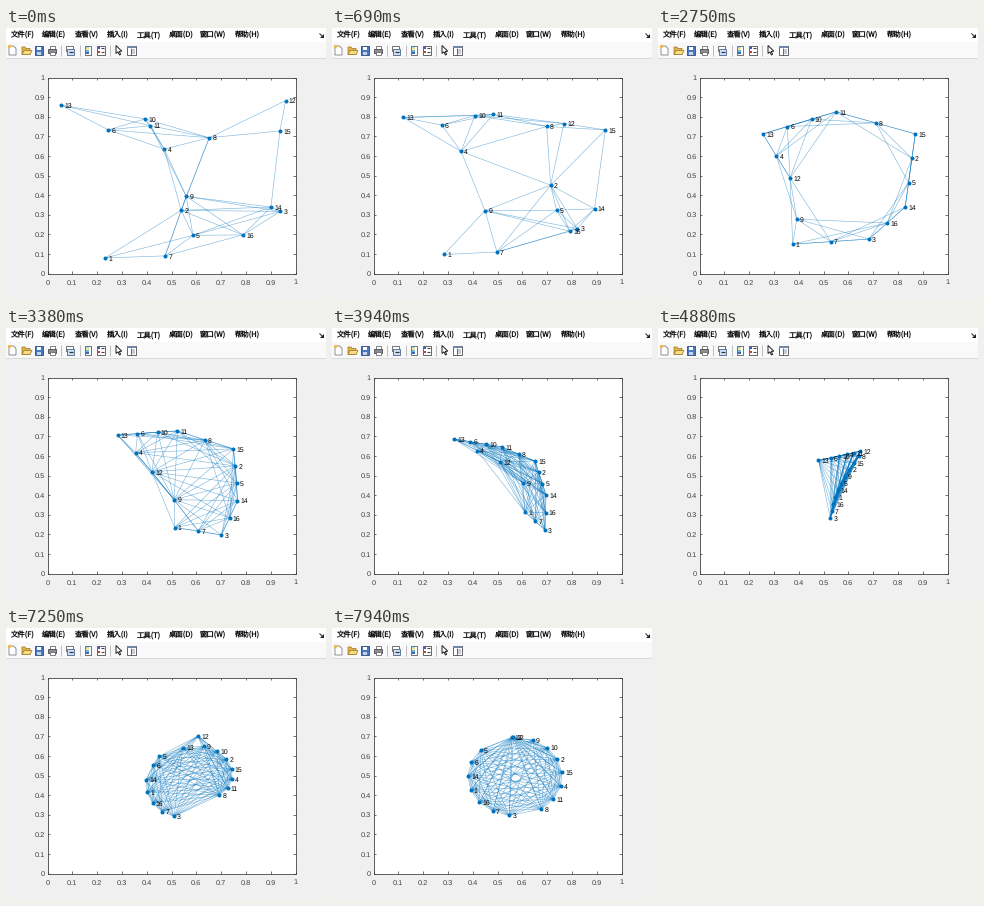
Animation of 320 by 272 pixels, one loop 8 s. Source, as a matplotlib script:

```python
import numpy as np
import matplotlib.pyplot as plt
from matplotlib.animation import FuncAnimation
from matplotlib.collections import LineCollection
from matplotlib.patches import Circle, Polygon, Rectangle

plt.rcParams["text.hinting"] = "none"

W, H, DPI = 320, 272, 80
PX = 72 / DPI                       # points per pixel
FRAMES, STEP = 200, 40
LEFT, RIGHT, TOP, BOTTOM = 41.5, 289.5, 49.5, 245.5
BLUE, INK = "#0072bd", "#3a3a3a"
N, REACH = 16, 0.41
SCALE = np.array([RIGHT - LEFT, BOTTOM - TOP])


# ---------- agent poses, in stage pixels ----------
def place(order, xs, ys):
    pose = np.zeros((N, 2))
    pose[np.array(order) - 1] = np.column_stack([xs, ys])
    return pose


LOOP = [13, 6, 10, 11, 8, 15, 2, 5, 14, 16, 3, 7, 1, 9, 12, 4]
ROW = [3, 7, 16, 1, 14, 13, 5, 6, 9, 10, 2, 15, 4, 11, 8, 12]
CORNERS = [LOOP.index(a) for a in (13, 11, 15, 14, 3, 1, 9, 12)]


def outline(corners):
    """Spread all agents along the closed polygon through the corners."""
    xs, ys = (np.interp(np.arange(N), CORNERS, c, period=N) for c in zip(*corners))
    return place(LOOP, xs, ys)


scatter = np.array([
    (99, 230), (174, 183), (275, 183), (159, 121), (186, 208), (102, 102),
    (159, 228), (203, 110), (181, 168), (139, 91), (144, 98), (281, 72),
    (55, 77), (265, 179), (274, 103), (237, 207)])
ring = outline([(105, 106), (178, 84), (257, 106), (247, 179),
                (211, 211), (135, 216), (139, 191), (132, 150)])
crescent = outline([(122, 111), (170, 119), (203, 133), (214, 167),
                    (213, 202), (193, 184), (191, 155), (168, 134)])

# on the way to the ring: a wider ring, with the longest trips lagging
hub = np.array([187, 150])
wide = hub + (ring - hub) * (1.2, 1.1)
trip = np.hypot(*(ring - scatter).T)
lag = 0.4 * (trip / trip.max())[:, None] ** 2
spread = wide + (scatter - wide) * lag

top, side = np.linspace(0, 1, 6) ** 0.75, np.linspace(0, 1, 10)
wedge = place([13, 6, 10, 4, 11, 12, 8, 15, 2, 9, 5, 14, 1, 16, 7, 3],
              np.r_[160 + 41.5 * top,
                    200.5 - 27.5 * side - 5 * np.sin(np.pi * side)],
              np.r_[132 - 8.5 * top, 128 + 62 * side])
line = place(ROW, np.linspace(129, 237, N), np.linspace(192, 102.5, N))
angle = np.radians(np.r_[94, 92, np.linspace(68, -56, 7), np.linspace(-97, -223, 7)])
circle = place([13, 12, 9, 10, 2, 15, 4, 11, 8, 3, 7, 16, 1, 14, 6, 5],
               183 + 0.19 * SCALE[0] * np.cos(angle),
               148.5 - 0.2 * SCALE[1] * np.sin(angle))

TIMES = np.array([0, 1440, 2750, 3940, 4880, 6200])
POSES = np.array([scatter, spread, ring, crescent, wedge, line])
SLOPES = np.gradient(POSES, TIMES, axis=0)
SLOPES[-1] = 0
TURN, END = 6420, 7940


def pose_at(t):
    if t >= TURN:
        s = (1 - np.exp(-2.4 * (t - TURN) / (END - TURN))) / (1 - np.exp(-2.4))
        return line + (circle - line) * s
    if t >= TIMES[-1]:
        return line
    i = np.searchsorted(TIMES, t, side="right") - 1
    d = TIMES[i + 1] - TIMES[i]
    s = (t - TIMES[i]) / d
    return ((1 + 2 * s) * (1 - s) ** 2 * POSES[i]
            + s * (1 - s) ** 2 * d * SLOPES[i]
            + s * s * (3 - 2 * s) * POSES[i + 1]
            + s * s * (s - 1) * d * SLOPES[i + 1])


A, B = np.triu_indices(N, 1)


def links(p):
    near = np.hypot(*((p[A] - p[B]) / SCALE).T) < REACH
    return np.stack([p[A[near]], p[B[near]]], axis=1)


# ---------- window ----------
fig = plt.figure(figsize=(W / DPI, H / DPI), dpi=DPI, facecolor="#f0f0f0")
ax = fig.add_axes([0, 0, 1, 1])
ax.set_xlim(0, W)
ax.set_ylim(H, 0)
ax.axis("off")


def rect(x, y, w, h, fill, edge="none", lw=0.8):
    ax.add_patch(Rectangle((x, y), w, h, fc=fill, ec=edge, lw=lw * PX))


def stroke(xs, ys, color=INK, lw=0.9):
    ax.plot(xs, ys, color=color, lw=lw * PX, solid_capstyle="butt")


def poly(points, fill, edge="none", lw=0.7):
    ax.add_patch(Polygon(points, fc=fill, ec=edge, lw=lw * PX))


def label(x, y, s, size, ha="left", color=INK, font="Liberation Sans"):
    return ax.text(x, y, s, fontsize=size * PX, ha=ha, va="baseline",
                   color=color, family=font)


rect(-1, -1, W + 2, 15, "#ffffff")
rect(-1, 14, W + 2, 16, "#f9f9f9")
stroke([-1, W], [30, 30], "#d8d8d8")

menu = ["文件(F)", "编辑(E)", "查看(V)", "插入(I)",
        "工具(T)", "桌面(D)", "窗口(W)", "帮助(H)"]
for x, s in zip([4, 36, 68, 100, 131, 162, 194, 229], menu):
    label(x, 9.8, s, 7.4, color="#111111", font="Noto Sans CJK JP")
stroke([313.5, 316.5], [5.5, 8.5], "#222222", 1)
poly([(317.5, 6), (317.5, 9.5), (314, 9.5)], "#222222")

# new, open, save, print
poly([(3, 18), (7.5, 18), (10, 20.5), (10, 27), (3, 27)], "#ffffff", "#666666")
ax.add_patch(Circle((3.5, 18.5), 1.6, fc="#f0b840"))
poly([(16, 19), (19, 19), (20, 20.5), (24, 20.5), (24, 26.5), (16, 26.5)],
     "#e2b54a", "#9a7420")
poly([(18, 22.5), (26, 22.5), (24, 26.5), (16, 26.5)], "#f8dc88", "#9a7420")
rect(29, 18, 7.5, 8.5, "#4a78c0", "#28457c")
rect(30.5, 18.5, 4.5, 3, "#ffffff")
rect(31, 23.5, 3.5, 3, "#c8d4e8")
rect(43.5, 17.5, 5, 4, "#ffffff", "#666666")
rect(42, 21, 8, 4, "#8d8d94", "#44444c")
rect(43.5, 24, 5, 3, "#ffffff", "#666666")
# link, color bar, legend
rect(59.5, 17.5, 7, 5, "#ffffff", "#555555")
rect(61, 20.5, 7, 6, "#cfe0f4", "#3f5f8c")
stroke([62.5, 66.5], [23.5, 23.5], "#333333", 1.2)
rect(78.5, 17.5, 6, 9, "#ffffff", "#555555")
for i, c in enumerate(["#a8d8f0", "#f0e8a0", "#70b8d8", "#3868b8"]):
    rect(80, 18.5 + 1.8 * i, 3, 1.8, c)
rect(91, 18, 8, 8.5, "#ffffff", "#444444")
for y, c in [(20.3, "#3060c0"), (24, "#c04040")]:
    rect(92.3, y - 1, 2, 2, c)
    stroke([95.3, 97.8], [y, y], "#444444", 1.1)
# pointer, inspector
poly([(110, 17.5), (110, 25.5), (112, 23.8), (113.4, 27), (114.6, 26.4),
      (113.3, 23.4), (115.8, 23.2)], "#ffffff", "#111111", 0.9)
rect(121, 18, 8.5, 8.5, "#ffffff", "#444444")
rect(121, 18, 8.5, 1.8, "#7088a8")
rect(125, 20.5, 4, 5.5, "#c4ccd8")
stroke([125, 125], [20, 26.5], "#444444", 0.7)
for x in (55, 74, 104):
    stroke([x, x], [17, 28], "#b0b0b0", 0.8)

# ---------- axes ----------
rect(LEFT, TOP, *SCALE, "#ffffff", INK, 0.8)
for i in range(11):
    x = LEFT + SCALE[0] * i / 10
    y = BOTTOM - SCALE[1] * i / 10
    for a, b in [(BOTTOM, BOTTOM - 2.5), (TOP, TOP + 2.5)]:
        stroke([x, x], [a, b], lw=0.7)
    for a, b in [(LEFT, LEFT + 2.5), (RIGHT, RIGHT - 2.5)]:
        stroke([a, b], [y, y], lw=0.7)
    s = f"{i / 10:g}"
    label(x, 256.5, s, 7.4, "center", "#404040")
    label(38.5, y + 2.7, s, 7.4, "right", "#404040")

# ---------- graph ----------
edges = LineCollection([], colors=BLUE, linewidths=0.6 * PX, alpha=0.5, zorder=3)
ax.add_collection(edges)
dots, = ax.plot([], [], "o", color=BLUE, ms=4 * PX, mew=0, zorder=4)
tags = [label(0, 0, str(i + 1), 6.9, color="#000000") for i in range(N)]
for tag in tags:
    tag.set_zorder(5)


def draw(n):
    p = pose_at((n + 0.5) * STEP)
    edges.set_segments(links(p))
    dots.set_data(p[:, 0], p[:, 1])
    for tag, (x, y) in zip(tags, p):
        tag.set_position((x + 3.2, y + 2.7))
    return [edges, dots, *tags]


anim = FuncAnimation(fig, draw, frames=FRAMES, interval=STEP,
                     init_func=lambda: draw(0), repeat=True, repeat_delay=0)
plt.show()
```
